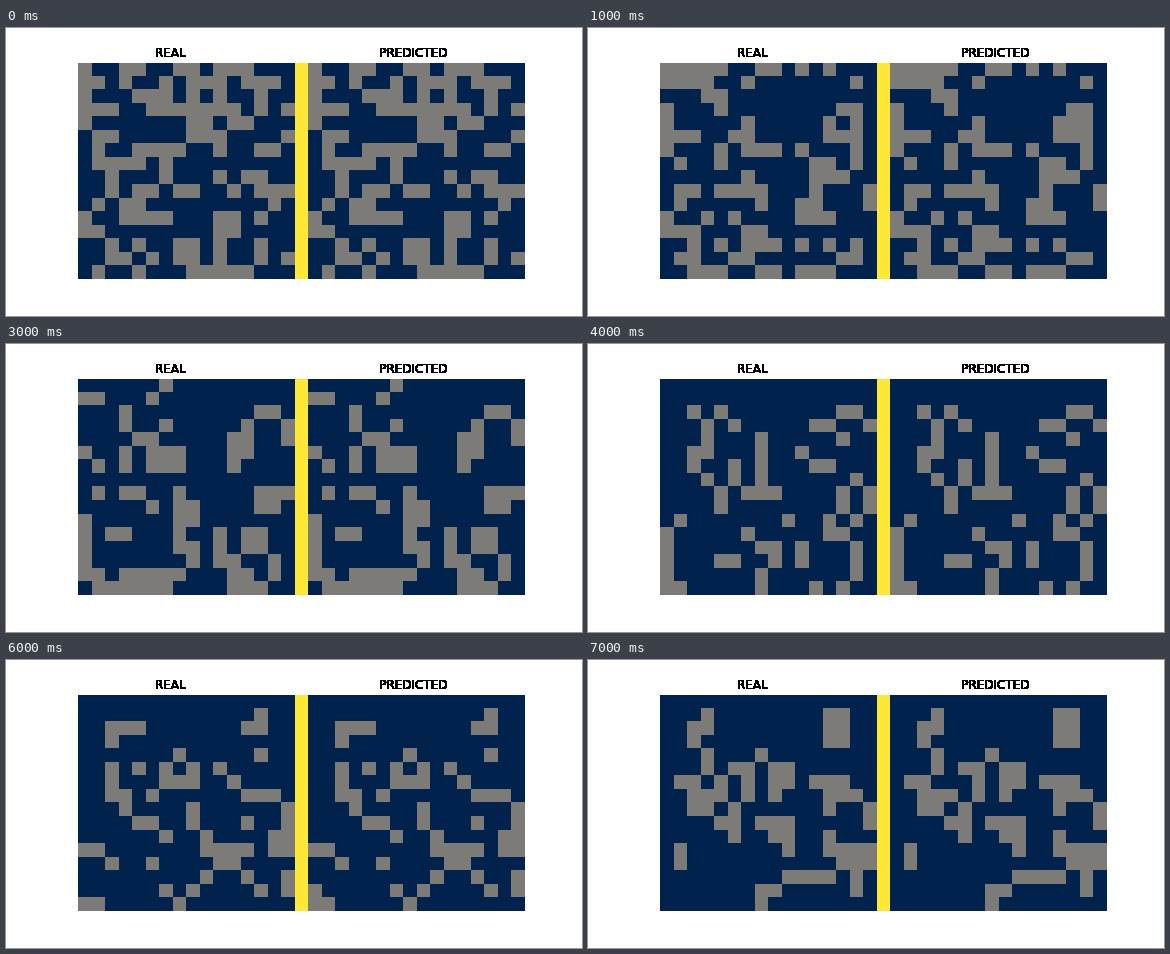
A matplotlib script that plays this animation: 576x288 px, repeating every 8 s.

```python
import numpy as np
import matplotlib.pyplot as plt
from matplotlib.animation import FuncAnimation

SIZE = 16
STEPS = 8

# Live columns of each row at the start; every later board follows from it
SEED = [
    [0, 3, 4, 7, 8, 10, 11, 12], [0, 1, 3, 6, 8, 9, 10, 12, 13, 14],
    [0, 4, 5, 6, 8, 10, 13], [0, 1, 2, *range(5, 12), 13, 15],
    [0, 8, 9, 11, 12], [1, 2, 8, 9, 10, 15],
    [1, *range(4, 8), 10, 13, 14], [*range(1, 5), 6],
    [2, 6, 10, 12, 13], [2, 4, 5, 7, 8, 11, 13, 14, 15],
    [1, 3, 4, 14], [0, *range(3, 7), 10, 11, 13],
    [0, 1, 10, 11], [2, 4, 7, 8, 10, 13],
    [2, 3, 5, 7, 8, 10, 13, 15], [1, 4, *range(8, 13)],
]

# Wrongly predicted cells, by step
MISSES = {1: [(4, 13), (13, 14)], 2: [(0, 1)], 6: [(14, 0)], 7: [(6, 4)]}


def life_step(grid):
    """One Game of Life step with dead borders."""
    padded = np.pad(grid, 1)
    total = sum(padded[r:r + SIZE, c:c + SIZE]
                for r in range(3) for c in range(3))
    return ((total == 3) | ((grid == 1) & (total == 4))).astype(int)


def board(real, step):
    """Real grid, divider and predicted grid side by side."""
    predicted = real.copy()
    for cell in MISSES.get(step, []):
        predicted[cell] = 1 - predicted[cell]
    divider = np.full((SIZE, 1), 2)
    return np.hstack([real, divider, predicted])


grid = np.zeros((SIZE, SIZE), int)
for row, cols in enumerate(SEED):
    grid[row, cols] = 1

boards = []
for step in range(STEPS):
    boards.append(board(grid, step))
    grid = life_step(grid)

plt.rcParams["font.family"] = "DejaVu Sans"
fig = plt.figure(figsize=(8, 4), dpi=72, facecolor="white")
ax = fig.add_axes([0.125, 0.11, 0.775, 0.77])
image = ax.imshow(boards[0], cmap="cividis", vmin=0, vmax=2)
ax.set_anchor("N")
ax.axis("off")

# Stacked copies harden the antialiased edges of the heading
heading = "REAL" + " " * 50 + "PREDICTED"
for _ in range(100):
    ax.annotate(heading, (0.5, 1), xycoords="axes fraction",
                xytext=(0, 6), textcoords="offset points",
                ha="center", va="baseline", fontsize=12, color="black")


def update(step):
    image.set_data(boards[step])
    return [image]


anim = FuncAnimation(fig, update, frames=STEPS, interval=1000, repeat=True)
plt.show()
```
